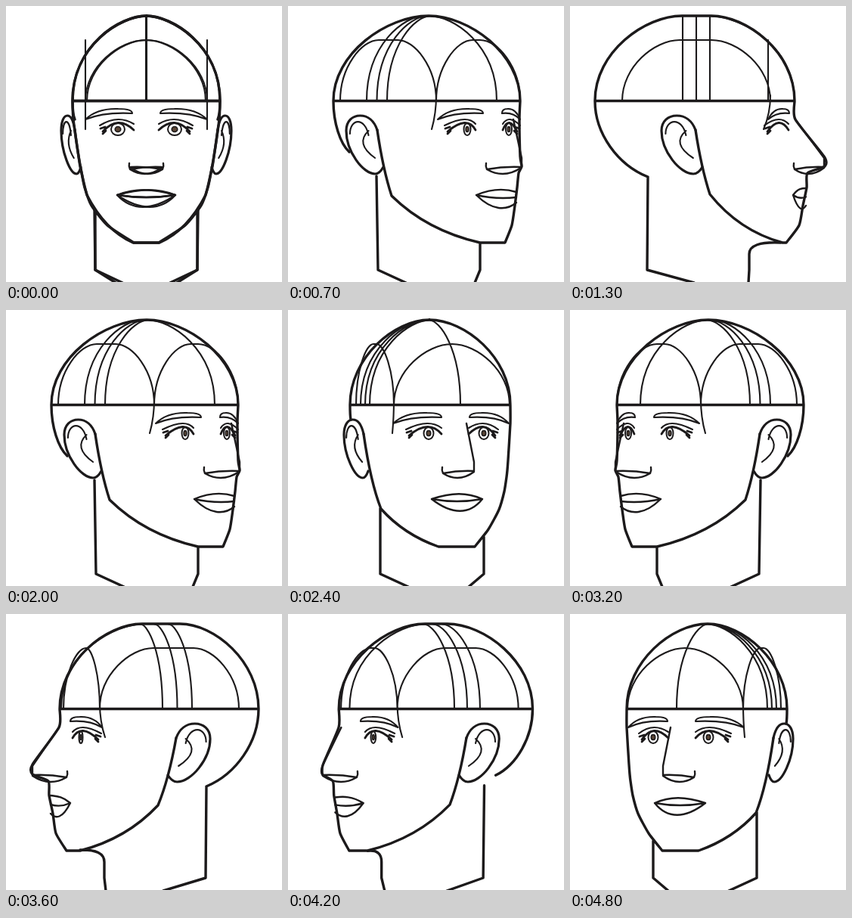
These frames come from a looping animation (365 px wide and 365 px high, 5000 ms). An HTML page:

```html
<!DOCTYPE html>
<html lang="en">
<head>
<meta charset="utf-8">
<title>Turning head</title>
<style>
html, body { margin: 0; width: 100%; height: 100%; overflow: hidden; background: #fff; }
svg { display: block; width: 100vw; height: 100vh; }
g { fill: none; stroke: #1c1a1b; stroke-linecap: round; stroke-linejoin: round; }
</style>
</head>
<body>
<svg viewBox="0 0 365 365"><g id="head"></g></svg>
<script>
// Each pose faces left and gives the x positions of the landmarks; heights are shared.
//   profile: outline at the heights in profileY      dome: flat top from, to, back, nape x, nape y
//   arches: left, flat from, to, right               bands: brim first, last, top first, last
//   eyes: inner, pupil, outer, iris, brow in, out     jaw: chin, corner x, corner y
//   ear: front, back, lobe      mouth: front, corner, upper y, lower y
//   throat: start x, y, neck, collar                 nape: start x, y, neck, collar
const profileY = [126, 150, 199, 212, 221, 240, 264, 290, 313];

const front = {
  profile: [88, 89, 96, 98, 100, 104, 113, 134, 169],
  dome: [186, 186, 283, 280, 150], square: 0.66,
  frontArch: [107, 186, 186, 266], sideArch: [266, 266, 266, 266], temple: 266,
  center: [186, 186], bands: [88, 88, 186, 186],
  eyes: [[202, 223, 243, 9, 204, 266]],
  bridge: [], nose: [165, 207], mouth: [147, 224, 250, 250],
  jaw: [203, 264, 250], ear: [280, 298, 272],
  throat: [118, 270, 118, 154], nape: [254, 270, 253, 226]
};

const slight = {
  profile: [75, 75, 78, 79, 80, 83, 90, 104, 122],
  dome: [182, 182, 287, 286, 145], square: 0.56,
  frontArch: [76, 152, 152, 229], sideArch: [229, 252, 256, 279], temple: 231,
  center: [141, 182], bands: [261, 273, 182, 188],
  eyes: [[166, 183, 209, 6.5, 166, 230], [130, 110, 95, 6.5, 129, 77]],
  bridge: [133, 123], nose: [123, 164], mouth: [112, 179, 250, 250],
  jaw: [170, 246, 263], ear: [269, 295, 263],
  throat: [110, 300, 110, 130], nape: [247, 262, 247, 210]
};

const half = {
  profile: [62, 63, 62, 60, 64, 66, 69, 73, 82],
  dome: [183, 183, 309, 288, 193], square: 0.56,
  frontArch: [62, 115, 125, 173], sideArch: [173, 224, 249, 300], temple: 179,
  center: [93, 180], bands: [238, 265, 182, 190],
  eyes: [[121, 132, 158, 4.5, 111, 171], [85, 77, 66, 4, 86, 62]],
  bridge: [71, 60], nose: [61, 106], mouth: [67, 120, 246, 260],
  jaw: [115, 232, 251], ear: [251, 292, 243],
  throat: [115, 315, 115, 122], nape: [252, 225, 250, 213]
};

const wide = {
  profile: [71, 70, 35, 35, 56, 57, 62, 66, 80],
  dome: [180, 230, 334, 265, 228], square: 0.56,
  frontArch: [76, 106, 106, 124], sideArch: [124, 195, 248, 308], temple: 131,
  center: [73, 180], bands: [207, 246, 178, 215],
  eyes: [[88, 99, 122, 2.5, 85, 127]],
  bridge: [70, 35], nose: [35, 80], mouth: [59, 85, 240, 264],
  jaw: [98, 201, 253], ear: [225, 270, 214],
  throat: [98, 312, 130, 132], nape: [265, 228, 264, 208]
};

const side = {
  profile: [72, 71, 33, 32, 55, 56, 61, 66, 83],
  dome: [182, 221, 336, 266, 226], square: 0.58,
  frontArch: [107, 107, 107, 107], sideArch: [104, 182, 224, 300], temple: 113,
  center: [72, 182], bands: [184, 220, 184, 220],
  eyes: [[80, 92, 108, 0, 79, 107]],
  bridge: [71, 33], nose: [33, 72], mouth: [57, 74, 241, 264],
  jaw: [88, 184, 249], ear: [203, 248, 194],
  throat: [90, 313, 132, 133], nape: [266, 226, 267, 205]
};

const brimY = 125.5;
const mix = (a, b, t) => a + (b - a) * t;

// Mixes two poses; parts hidden in the second are dropped.
function blend(a, b, t) {
  if (typeof b === "number") return mix(a, b, t);
  if (Array.isArray(b)) return b.map((v, i) => blend(a[i], v, t));
  return Object.fromEntries(Object.keys(b).map(key => [key, blend(a[key], b[key], t)]));
}

// Leaves (x0, y0) upright and arrives level at (x1, y1).
const quarter = (x0, y0, x1, y1, k) =>
  `M${x0} ${y0}C${x0} ${mix(y0, y1, k)} ${mix(x1, x0, 1 - k)} ${y1} ${x1} ${y1}`;

const arch = (left, from, to, right, top, k = 0.56) =>
  quarter(left, brimY, from, top, k) + `H${to}` + quarter(right, brimY, to, top, k);

function smooth(points) {
  const at = i => points[Math.max(0, Math.min(points.length - 1, i))];
  const handle = (i, sign) => at(i).map((v, axis) => v + sign * 0.1 * (at(i + 1)[axis] - at(i - 1)[axis]));
  return "M" + points[0] + points.slice(1).map((p, i) => `C${handle(i, 1)} ${handle(i + 1, -1)} ${p}`).join("");
}

const stroke = (width, ...paths) => `<path stroke-width="${width}" d="${paths.join("")}"/>`;

function skull({ profile, dome: [from, to, back, napeX, napeY], square }) {
  const left = profile[0], drop = napeY - brimY;
  return arch(left, from, to, back, 13, square) + `M${left} ${brimY}H${back}` +
    `C${back} ${brimY + drop * 0.43} ${mix(napeX, back, 0.57)} ${brimY + drop * 0.84} ${napeX} ${napeY}`;
}

function face({ profile, jaw: [chin, x, y], ear: [earX] }) {
  return smooth(profile.map((px, i) => [px, profileY[i]])) +
    `L${chin} 313Q${mix(chin, x, 0.6)} 297 ${x} ${y}Q${mix(x, earX, 0.6)} ${y - 35} ${earX} 164`;
}

function neck({ throat: [x, y, neckX, collar], nape: [backX, backY, backNeck, backCollar] }) {
  return `M${x} ${y}Q${neckX} 311 ${neckX} 328V349L${collar} 366` +
    `M${backX} ${backY}L${backNeck} 349L${backCollar} 366`;
}

function partings({ frontArch, sideArch, temple, center, bands }) {
  const part = (brim, top) => quarter(brim, brimY, top, 13.5, 0.68);
  const strips = [0, 0.5, 1].map(t => part(mix(bands[0], bands[1], t), mix(bands[2], bands[3], t)));
  return arch(...frontArch, 45) + arch(...sideArch, 45) + part(...center) + strips.join("") +
    `M${sideArch[0]} 118Q${sideArch[0]} 142 ${temple} 163`;
}

function ear([front, back, lobe]) {
  const x = t => mix(front, back, t), low = t => mix(lobe, back, t);
  const rim = `M${front} 164C${x(0.1)} 152 ${x(0.3)} 145 ${x(0.55)} 145S${back} 152 ${back} 165` +
    `C${back} 192 ${low(0.55)} 222 ${low(0.22)} 222Q${low(0.1)} 222 ${lobe} 213`;
  const folds = `M${x(0.88)} 169C${x(0.88)} 149 ${x(0.4)} 146 ${x(0.28)} 171` +
    `M${x(0.28)} 165Q${x(0.72)} 182 ${x(0.07)} 201`;
  return stroke(3.2, rim) + stroke(2.1, folds);
}

function eye([inner, pupil, outer, iris, browIn, browOut]) {
  const out = Math.sign(outer - inner), brow = t => mix(browIn, browOut, t);
  const ring = (rx, ry, style) => `<ellipse cx="${pupil}" cy="163" rx="${rx}" ry="${ry}" ${style}/>`;
  return stroke(2.8, `M${inner} 164Q${pupil} 144 ${outer} 166`,
      `M${outer - 3 * out} 160l${6 * out} 2M${outer - 4 * out} 165l${4 * out} 4`) +
    stroke(2.1, `M${inner} 156Q${pupil} 143 ${outer + 4 * out} 158`,
      `M${browIn} 142Q${browIn} 136 ${brow(0.3)} 136Q${brow(0.75)} 135 ${browOut} 150Q${brow(0.6)} 140 ${browIn} 142`) +
    (iris ? ring(iris, 8, 'stroke-width="2"') + ring(iris * 0.42, 3.5, 'stroke-width="1.6" fill="#5b4636"') : "");
}

function nose({ bridge: [top, tip], nose: [x, wing] }) {
  const middle = (x + wing) / 2;
  return (tip ? `M${top} 150L${tip} 201V213` : "") +
    `M${x} 213Q${middle} 212 ${wing} 216Q${wing + 2} 212 ${wing + 1} 208` +
    `M${x} 214Q${middle} 229 ${wing} 216`;
}

function mouth([x, corner, upper, lower]) {
  const at = t => mix(x, corner, t);
  return `M${x} ${upper}C${at(0.3)} 241 ${at(0.6)} 241 ${corner} 250` +
    `M${x} ${(upper + lower) / 2}Q${at(0.5)} 256 ${corner} 250` +
    `M${x} ${lower}C${at(0.25)} 271 ${at(0.6)} 271 ${corner} 250`;
}

const markup = pose =>
  stroke(3.4, skull(pose), face(pose), neck(pose)) +
  stroke(2.1, partings(pose)) +
  stroke(2.4, nose(pose), mouth(pose.mouth)) +
  pose.eyes.map(eye).join("") + ear(pose.ear);

const mirrored = (content, span) => `<g transform="translate(${span} 0) scale(-1 1)">${content}</g>`;

const frontHalf = markup(front);
const views = [
  frontHalf + mirrored(frontHalf, 371),
  ...[slight, blend(slight, half, 0.7), half, blend(half, wide, 0.58), wide, side].map(markup)
];

// Turn runs 0 to 6 (right), back through 0 to -6 (left), and home again.
function turnAt(time) {
  const step = time < 300 ? 0
    : time < 1600 ? Math.min(6, 1 + Math.floor((time - 300) / 200))
    : 7 + Math.floor((time - 1600) / 200);
  return step <= 6 ? step : step <= 18 ? 12 - step : step - 24;
}

const head = document.getElementById("head");
let shown = null;

function draw(now) {
  const turn = turnAt(now % 5000);
  if (turn === shown) return;
  shown = turn;
  const view = views[Math.abs(turn)];
  head.innerHTML = turn > 0 ? mirrored(view, 369) : view;
}

const began = performance.now();
function tick() {
  draw(performance.now() - began);
  requestAnimationFrame(tick);
}
tick();
</script>
</body>
</html>
```
